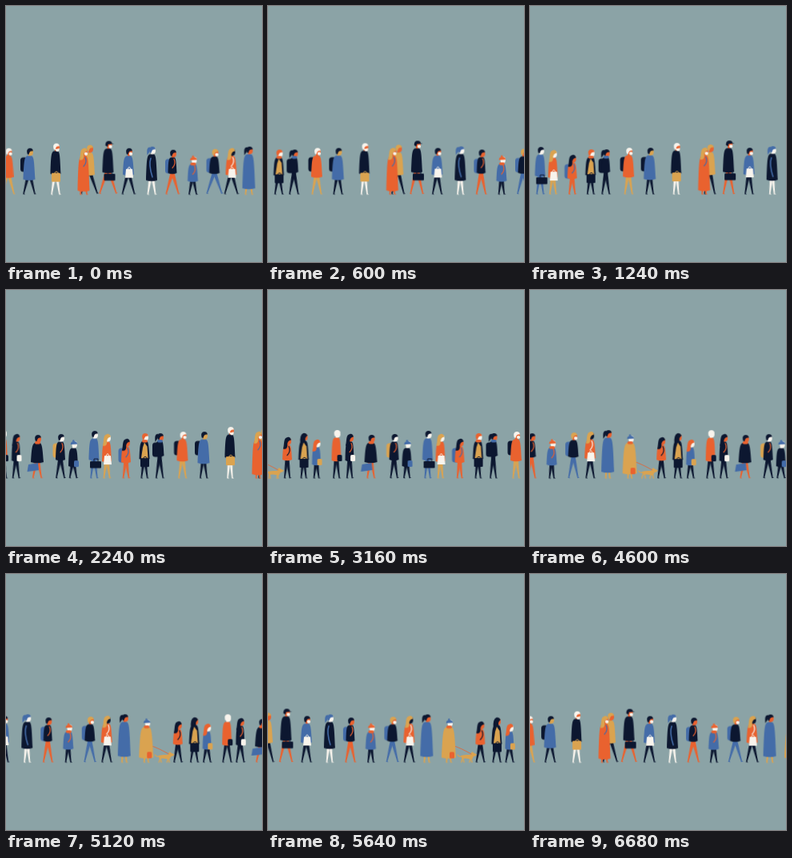
An HTML page for the animation above (6720 ms loop, 320 by 320 pixels).

```html
<!DOCTYPE html>
<html lang="en">
<head>
<meta charset="utf-8">
<title>Walking crowd</title>
<style>
html, body { margin: 0; width: 100%; height: 100%; overflow: hidden; background: #8ba3a6; }
svg { display: block; width: 100%; height: 100%; }
#belt { animation: belt 6720ms steps(168) infinite; }
.leg { animation: swing 336ms linear infinite alternate; }
.bob { animation: bob 168ms ease-in-out infinite alternate; }
@keyframes belt { to { transform: translateX(654px); } }
/* Feet linger apart and pass each other quickly */
@keyframes swing {
  from { transform: rotate(var(--a)); }
  44% { transform: rotate(calc(.45 * var(--a))); }
  56% { transform: rotate(calc(-.45 * var(--a))); }
  to { transform: rotate(calc(-1 * var(--a))); }
}
@keyframes bob {
  from { transform: translateY(.7px); }
  to { transform: translateY(0); }
}
</style>
</head>
<body>
<svg viewBox="0 0 320 320"><g id="belt"></g></svg>
<script>
const LOOP = 654, GROUND = 235;
const INK = { d: '#0c1730', b: '#446ca8', o: '#e9622f', y: '#daa350', w: '#f8f4ed' };

const shape = (d, c) => `<path d="${d}" fill="${INK[c]}"/>`;
const line = (d, c, w) => `<path d="${d}" fill="none" stroke="${INK[c]}" stroke-width="${w}" stroke-linecap="round"/>`;
const oval = (x, y, rx, ry, c) => `<ellipse cx="${x}" cy="${y}" rx="${rx}" ry="${ry}" fill="${INK[c]}"/>`;
const box = (x, y, w, h, c, r = 1) => `<rect x="${x}" y="${y}" width="${w}" height="${h}" rx="${r}" fill="${INK[c]}"/>`;
const swing = (x, y, a, art) =>
  `<g transform="translate(${x} ${y})"><g class="leg" style="--a:${a}deg">${art}</g></g>`;

function leg(hip, angle, c) {
  const len = GROUND - hip;
  return swing(0, hip, angle, shape(`M-2.4 0H2.4L.7 ${len - .8}L2 ${len + .4}H-.7Z`, c));
}

function coat(neck, hem, w, c) {
  const top = w * .66;
  return shape(`M-2 ${neck}H2.5C${top + 1} ${neck + 1} ${top + 1.2} ${neck + 6} ${w} ${hem - 1}` +
    `Q0 ${hem + 1.5} ${-w} ${hem - 1}C${-top - 1.5} ${neck + 8} ${-top - 1.5} ${neck + 1} -2 ${neck}Z`, c);
}

// Hair and headwear, measured from the top of the head
const hairStyles = {
  short: c => shape('M-3 8Q-5 1 0 0Q5 -.5 5 4Q1 3 0 6L-1 9Z', c),
  long: c => shape('M5 4Q4 -1 0 0C-6 1 -4 10 -6 16Q-1 18 0 12Q-1 5 5 4Z', c),
  tail: c => hairStyles.short(c) + shape('M-2 1Q-8 -1 -6.5 12Q-3 8 -2 4Z', c),
  hat: c => shape('M-4 5.5Q-4 1 1 1Q5 1 5.5 5Z', c) + oval(0, .6, 1.4, 1.4, c),
  cap: c => shape('M-4 6Q-4 0 1 0Q5 0 5 3L8 4L0 4.5L-1 8Z', c),
  hood: c => shape('M5 3Q3 -1 -1 0Q-6 2 -5 14L4 13Q-1 8 5 3Z', c)
};

const parts = {
  pack: (p, c) => box(-p.w - 3.5, p.neck + 2, 9, 18, c, 3.5),
  strap: (p, c) => line(`M2 ${p.neck + 2}Q5 ${p.neck + 8} 0 ${p.neck + 13}`, c, 1.2),
  scarf: (p, c) => box(-3, p.neck - 1.5, 7, 3.6, c, 1.8),
  mask: (p, c) => oval(3, p.top + 7, 2.2, 1.9, c),
  beard: (p, c) => shape(`M-2 ${p.top + 6}Q1 ${p.top + 8} 4.5 ${p.top + 6}Q5.5 ${p.top + 11} 1 ${p.top + 10}Z`, c),
  arm: (p, c) => line(`M-1 ${p.neck + 5}Q-4 ${p.neck + 13} 1 ${p.hem - 5}`, c, 1.6),
  front: (p, c) => shape(`M0 ${p.neck + 2}L3.5 ${p.neck + 7}L${p.w - 1.8} ${p.hem}H${2.2 - p.w}L-2 ${p.neck + 8}Z`, c),
  bag: (p, c) => line(`M-2 ${p.hem - 1}Q1 ${p.hem - 7} 4 ${p.hem - 1}`, c, 1) + box(-5, p.hem - 2, 11, 11, c),
  satchel: (p, c) => shape(`M-11 ${p.hem + 2}L1 ${p.hem}L2 ${p.hem + 9}L-12.5 ${p.hem + 11}Z`, c),
  tote: (p, c) => line(`M-1 ${p.hem - 8}Q1 ${p.hem - 13} 3 ${p.hem - 8}`, c, 1) +
    shape(`M-3 ${p.hem - 8}H5L6 ${p.hem + 3}H-4Z`, c),
  case: (p, c) => line(`M0 ${p.hem + 2}V${p.hem - 2}H5V${p.hem + 2}`, c, 1) + box(-5, p.hem + 1, 14, 8.5, c),
  purse: (p, c) => box(1, p.hem - 8, 6, 8, c, 1.5)
};

// look: coat, legs, hair, face; extras: "part colour" pairs
function person(x, top, hem, w, look, style, extras, stride = 14) {
  const [body, legs, hair, face] = look;
  const p = { top, hem, w, neck: top + 9.5 };
  const hip = (top + GROUND) / 2;
  const items = extras ? extras.split(',').map(s => s.split(' ')) : [];
  const add = back => items.filter(([n]) => (n === 'pack') === back).map(([n, c]) => parts[n](p, c)).join('');
  return `<g transform="translate(${x} 0)"><g class="bob">` +
    leg(hip, -stride, legs) + leg(hip, stride, legs) + add(true) +
    box(-1, top + 7, 3, 5, face, 0) + coat(p.neck, hem, w, body) +
    `<g transform="translate(.3 ${top}) scale(.9)">` +
    oval(1.6, 5.6, 3.6, 4.7, face) + hairStyles[style](hair) + '</g>' +
    add(false) + '</g></g>';
}

function dog(x) {
  const paw = (dx, a) => swing(dx, 229, a, line('M0 0V6.5', 'y', 1.3));
  return `<g transform="translate(${x} 0)">` +
    paw(-6, 26) + paw(-5, -26) + paw(4, 26) + paw(5, -26) +
    shape('M-8 227Q-2 225.5 4 226L6 222L8 223.5L12 225.5Q11 228 8 228L6 232Q-1 229.5 -6 231Z', 'y') +
    line('M-7 228Q-10 229 -12 226', 'y', 1.2) +
    line('M-16 215Q-7 218 5 225', 'o', .8) + '</g>';
}

const crowd = [
  dog(354),
  person(331, 181, 230, 9, 'yyyw', 'short', 'scarf o,purse o', 8)
    .replace(hairStyles.short('y'), hairStyles.hat('b')),
  person(303.5, 175, 228, 8, 'bydo', 'tail', '', 8),
  person(281.5, 177, 211, 7, 'odyd', 'long', 'strap w,tote w', 16),
  person(260.5, 178, 209, 6.5, 'dbyo', 'short', 'pack b,mask w', 19),
  person(233.5, 187, 219, 6.5, 'bdow', 'hat', 'scarf o,strap o', 11),
  person(208, 179, 209, 5.5, 'dodo', 'short', 'pack b,strap o', 16),
  person(182, 175, 218, 7, 'dwbw', 'tail', 'arm b', 9),
  person(153, 177, 211, 7, 'bddo', 'short', 'mask w,tote w', 15),
  person(104, 173, 211, 7, 'ydyo', 'short', '', 19),
  person(127.5, 168, 208, 7, 'dodo', 'cap', 'mask w,case d', 18),
  person(97, 177, 231, 7.5, 'ooyo', 'long', 'mask w,strap b', 8),
  person(62, 171, 210, 6.5, 'dwwo', 'short', 'beard w,bag y', 9),
  person(29, 177, 217, 7.5, 'bddy', 'short', 'pack d', 14),
  person(2.5, 177, 214, 7, 'oywo', 'short', 'pack d,mask w', 15),
  person(-26, 179, 208, 5.5, 'dddo', 'tail', 'pack d,scarf b', 15),
  person(-45, 179, 212, 6.5, 'ddow', 'short', 'front y,scarf o,bag d', 13),
  person(-68, 186, 216, 6, 'oodo', 'long', 'pack b,strap b', 14),
  person(-92, 180, 215, 6, 'oyyw', 'long', 'tote w', 13),
  person(-108, 176, 213, 6.5, 'bbdw', 'short', 'case d', 13),
  person(-134, 188, 221, 6, 'ddbw', 'hat', 'purse b', 18),
  person(-150, 180, 213, 6, 'dddw', 'short', 'pack y,strap o', 18),
  person(-179, 181, 216, 8, 'dodo', 'short', 'scarf o,satchel b', 19),
  person(-205.5, 180, 214, 5.5, 'dddo', 'long', 'strap o,purse w', 14),
  person(-222, 175, 214, 6, 'odww', 'short', 'purse d', 14),
  person(-247, 187, 219, 5.5, 'bdow', 'long', 'purse y', 15),
  person(-263, 179, 213, 6.5, 'dddo', 'hood', 'front y,bag d', 13),
  person(-283.5, 184, 213, 6, 'oddo', 'long', 'strap d', 15)
].join('');

document.getElementById('belt').innerHTML = crowd + `<g transform="translate(${-LOOP} 0)">${crowd}</g>`;
</script>
</body>
</html>
```
